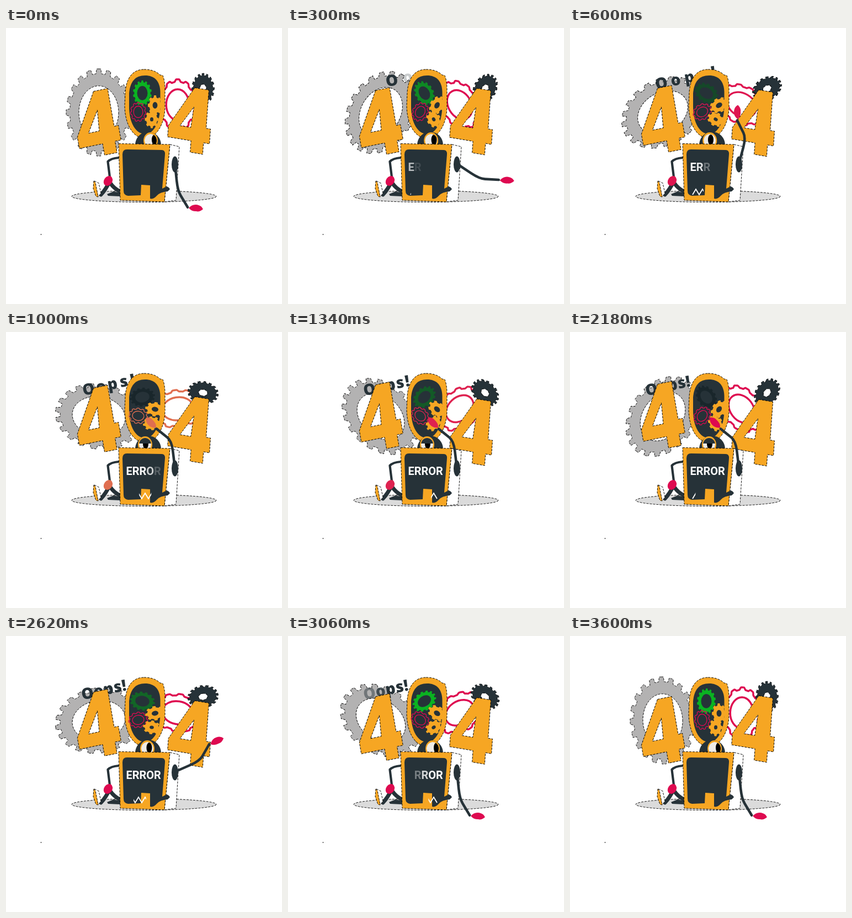
An HTML page with a canvas that plays this animation: 500x500 px, repeating every 3620 ms.

```html
<!DOCTYPE html>
<html lang="en">
<head>
<meta charset="utf-8">
<title>404 Error</title>
<style>
  html, body { margin: 0; width: 100%; height: 100%; overflow: hidden; background: #fff; }
  canvas { display: block; width: 500px; height: 500px; }
</style>
</head>
<body>
<canvas id="stage" width="500" height="500"></canvas>
<script>
const ctx = document.getElementById('stage').getContext('2d');
const LOOP = 3620;
const DARK = '#263238', ORANGE = '#f6a623', GREY = '#b3b2b2', BLACK = '#000';
const RAD = Math.PI / 180;

const clamp = v => Math.max(0, Math.min(1, v));
const mix = (a, b, p) => a + (b - a) * p;
const ramp = (t, from, to) => clamp((t - from) / (to - from));
const smooth = p => p * p * (3 - 2 * p);
const blend = (a, b, p) => `rgb(${a.map((v, i) => Math.round(mix(v, b[i], p))).join(',')})`;
const loopDistance = (t, at) => Math.min(Math.abs(t - at), LOOP - Math.abs(t - at));

function oval(x, y, rx, ry, angle = 0) {
  const path = new Path2D();
  path.ellipse(x, y, rx, ry, angle, 0, 2 * Math.PI);
  return path;
}

// Black outlines are thin and broken, coloured ones are solid.
function paint(path, fill, stroke, width = 0.9) {
  if (fill) { ctx.fillStyle = fill; ctx.fill(path, 'evenodd'); }
  if (!stroke) return;
  ctx.setLineDash(stroke === BLACK ? [4, 2] : []);
  ctx.strokeStyle = stroke;
  ctx.lineWidth = width;
  ctx.stroke(path);
  ctx.setLineDash([]);
}

function strokeShape(data, color, width) {
  ctx.lineCap = ctx.lineJoin = 'round';
  paint(new Path2D(data), null, color, width);
  ctx.lineCap = 'butt';
  ctx.lineJoin = 'miter';
}

// Flattened gear that turns as a rigid ellipse; a clipped cosine shapes the teeth.
function gear({ x, y, rx, ry, teeth, root, hole, angle, fill, stroke, width, sharp = 2.5 }) {
  const path = new Path2D(), steps = teeth * 20;
  for (let i = 0; i < steps; i++) {
    const a = 2 * Math.PI * i / steps;
    const r = mix(root, 1, clamp(0.5 + sharp * Math.cos(teeth * a)));
    path.lineTo(rx * r * Math.sin(a), -ry * r * Math.cos(a));
  }
  path.closePath();
  path.addPath(oval(0, 0, rx * hole, ry * hole));
  ctx.save();
  ctx.translate(x, y);
  ctx.rotate(angle);
  paint(path, fill, stroke, width);
  ctx.restore();
}

// Digit measured from its top right corner.
const four = new Path2D(
  'M-26 0H0V70H8V97H-3V118H-26V97H-69V76Z M-25 35L-28 73H-48Z');
const zeroOuter = new Path2D(
  'M250 75C262 75 272 78 279 85L284 86Q288 96 288 112V142C288 174 272 200 252 200' +
  'C230 200 215 174 215 140L216 116C218 90 230 75 250 75Z');
const zeroInner = new Path2D(
  'M252 86C269 86 279 96 279.5 116V142C279 170 268 192 252 192' +
  'C235 192 223 172 223 142V118C225 97 234 86 252 86Z');
const screen = new Path2D(
  'M219 220L282 221Q288.5 221 288 229L283 291L291 287Q295 288 297 292L293 296' +
  'Q279 297 273 304Q267 311 261 309V285L245 284L244 303L221 304Q213 303 213 295' +
  'L211 229Q211 220 219 220Z');

function drawGears(turn, red) {
  gear({ x: 168, y: 153, rx: 59, ry: 79, teeth: 20, root: 0.89, hole: 0.61,
    angle: turn, fill: GREY, stroke: BLACK });
  gear({ x: 311, y: 139, rx: 34, ry: 46, teeth: 12, root: 0.91, hole: 0.61,
    angle: -turn, stroke: red, width: 3.4, sharp: 1 });
  gear({ x: 357, y: 110, rx: 20.5, ry: 28, teeth: 16, root: 0.86, hole: 0.29,
    angle: turn, fill: DARK, stroke: BLACK });
}

function drawOops(t) {
  ctx.font = '800 28px "Open Sans", sans-serif';
  ctx.textAlign = 'center';
  ctx.fillStyle = DARK;
  let left = 138;
  [...'Oops!'].forEach((letter, i) => {
    const width = ctx.measureText(letter).width;
    const p = ramp(t, 200 + 90 * i, 1200 + 90 * i);
    const x = left + width / 2 + 50 * (1 - p) ** 2;
    left += width;
    ctx.save();
    ctx.globalAlpha = clamp(p * 25) * (1 - ramp(t, 2900 + 100 * i, 3200 + 100 * i));
    ctx.translate(x, 113.5 - (x - 149) * 0.22);
    ctx.rotate(-10 * RAD);
    ctx.fillText(letter, 0, 0);
    ctx.restore();
  });
}

function drawZero(t, turn, red) {
  paint(zeroOuter, ORANGE, BLACK);
  paint(zeroInner, DARK);
  const glow = clamp(1.6 - loopDistance(t, 3350) / 640)
    + 0.65 * clamp(1.5 - loopDistance(t, 1620) / 300);
  gear({ x: 247, y: 118, rx: 17, ry: 23, teeth: 14, root: 0.86, hole: 0.56,
    angle: -turn, fill: blend([25, 38, 43], [10, 178, 33], clamp(glow)) });
  gear({ x: 239.5, y: 152, rx: 14, ry: 17.5, teeth: 11, root: 0.87, hole: 0.6,
    angle: turn, stroke: red, width: 1.3, sharp: 1 });
  gear({ x: 270, y: 140, rx: 13, ry: 18, teeth: 8, root: 0.8, hole: 0.34,
    angle: turn, fill: ORANGE, sharp: 1.5 });
  gear({ x: 264, y: 165.5, rx: 12.5, ry: 16, teeth: 8, root: 0.8, hole: 0.24,
    angle: -turn, fill: ORANGE, sharp: 1.5 });
}

function drawFours(turn) {
  const shift = (1 - Math.cos(turn)) / 2;
  const drawFour = (...matrix) => {
    ctx.save();
    ctx.transform(...matrix);
    paint(four, ORANGE, BLACK);
    ctx.restore();
  };
  drawFour(0.98, -0.2, 0.17, 0.98, 184, 109.5 - 22.5 * shift);
  drawFour(0.985, 0.165, -0.07, 0.99, 367.5, 112.5 + 15.5 * shift);
}

function drawHead(lift) {
  const x = mix(262, 252, lift);
  const lid = 14 * clamp(lift * 8 - 7);
  const eye = oval(x, 204, 11, 12);
  paint(oval(257.5, 212, 23.5, 24), DARK);
  paint(oval(x, 204, 13, 15), ORANGE);
  ctx.save();
  ctx.clip(eye);
  paint(eye, '#eeebe6');
  paint(oval(x + mix(7, 1, lift), 202.5, 5, 9.5), BLACK);
  ctx.fillStyle = DARK;
  ctx.fillRect(x - 13, 188, 26, lid);
  ctx.restore();
}

function drawLegs(red) {
  paint(new Path2D('M183 301L195 296L208 299L207 305L185 304Z'), DARK);
  strokeShape('M204 235Q190 236 184.5 242L188 270', DARK, 4.2);
  strokeShape('M188 277Q182 291 172 302M189 281Q195 290 206 296', DARK, 7);
  paint(new Path2D('M160 277L168 281L172 299L167 306Z'), '#fff', BLACK);
  paint(new Path2D('M159 277L162 280L167 306L163 305L158 291Z'), ORANGE, BLACK);
  paint(oval(185, 277, 7.5, 9.5, 35 * RAD), red);
}

function drawBody(t) {
  paint(new Path2D('M297 211L314 215L308 312L287 315Z'), '#fff', BLACK);
  paint(new Path2D('M204 209.5L297 211L287 315L207 312Z'), ORANGE, BLACK);
  paint(screen, DARK);
  drawError(t);
  drawMouth(t % (LOOP / 2));
}

function drawError(t) {
  ctx.font = 'bold 20px Roboto, sans-serif';
  ctx.textAlign = 'left';
  ctx.fillStyle = '#fff';
  let x = 217.5;
  [...'ERROR'].forEach((letter, i) => {
    const shown = ramp(t, 30 + 220 * i, 430 + 220 * i);
    const gone = ramp(t, 2740 + 130 * i, 3040 + 130 * i);
    ctx.globalAlpha = shown * (1 - gone);
    ctx.fillText(letter, x, 258.5);
    x += ctx.measureText(letter).width;
  });
  ctx.globalAlpha = 1;
}

// A moving window reveals part of a fixed zigzag, twice per loop.
function drawMouth(phase) {
  const head = 220 + 52 * (1 - (1 - ramp(phase, 260, 1250)) ** 1.3);
  const tail = 220 + 53 * ramp(phase, 600, 1600);
  if (head <= tail) return;
  const zigzag = new Path2D();
  for (let i = 0; i < 9; i++) zigzag.lineTo(222 + 6 * i, i % 2 ? 292 : 302);
  ctx.save();
  ctx.beginPath();
  ctx.rect(tail, 285, head - tail, 30);
  ctx.clip();
  paint(zigzag, null, '#fff', 1.8);
  ctx.restore();
}

function drawArm(lift, red) {
  const upper = mix(84, -97, lift) * RAD;
  const fore = mix(59, -141, lift) * RAD;
  const hand = mix(5, -134, lift ** 3) * RAD;
  const reach = ([x, y], a, d) => [x + d * Math.cos(a), y + d * Math.sin(a)];
  const shoulder = [306, 246];
  const elbow = reach(shoulder, upper, 49);
  const wrist = reach(elbow, fore, 35);

  strokeShape(`M${shoulder}L${reach(elbow, upper, -18)}Q${elbow} ${reach(elbow, fore, 10)}L${wrist}`,
    DARK, 4.6);
  paint(oval(306, 247, 6, 14.5), DARK);

  ctx.save();
  ctx.translate(...wrist);
  ctx.rotate(hand);
  paint(new Path2D('M2 1Q8 -7 17 -6Q25 -5 28 1Q22 7 16 6Q8 7 2 1Z'), red);
  ctx.restore();
}

function draw(t) {
  const turn = 2 * Math.PI * t / LOOP;
  const lift = smooth(ramp(t, 60, 750)) - smooth(ramp(t, 2280, 3060));
  const red = blend([222, 10, 80], [224, 110, 80], clamp(1 - Math.abs(t - 1000) / 450));

  ctx.fillStyle = '#fff';
  ctx.fillRect(0, 0, 500, 500);
  paint(oval(250, 305, 131, 10.5), '#dbdbdb', BLACK);
  ctx.fillStyle = BLACK;
  ctx.fillRect(63, 373, 1, 2);
  drawGears(turn, red);
  drawOops(t);
  drawZero(t, turn, red);
  drawFours(turn);
  drawHead(lift);
  drawLegs(red);
  drawBody(t);
  drawArm(lift, red);
}

const start = performance.now();
function frame() {
  const t = (performance.now() - start) % LOOP;
  draw(Math.floor(t / 20) * 20);
  requestAnimationFrame(frame);
}
frame();
</script>
</body>
</html>
```
